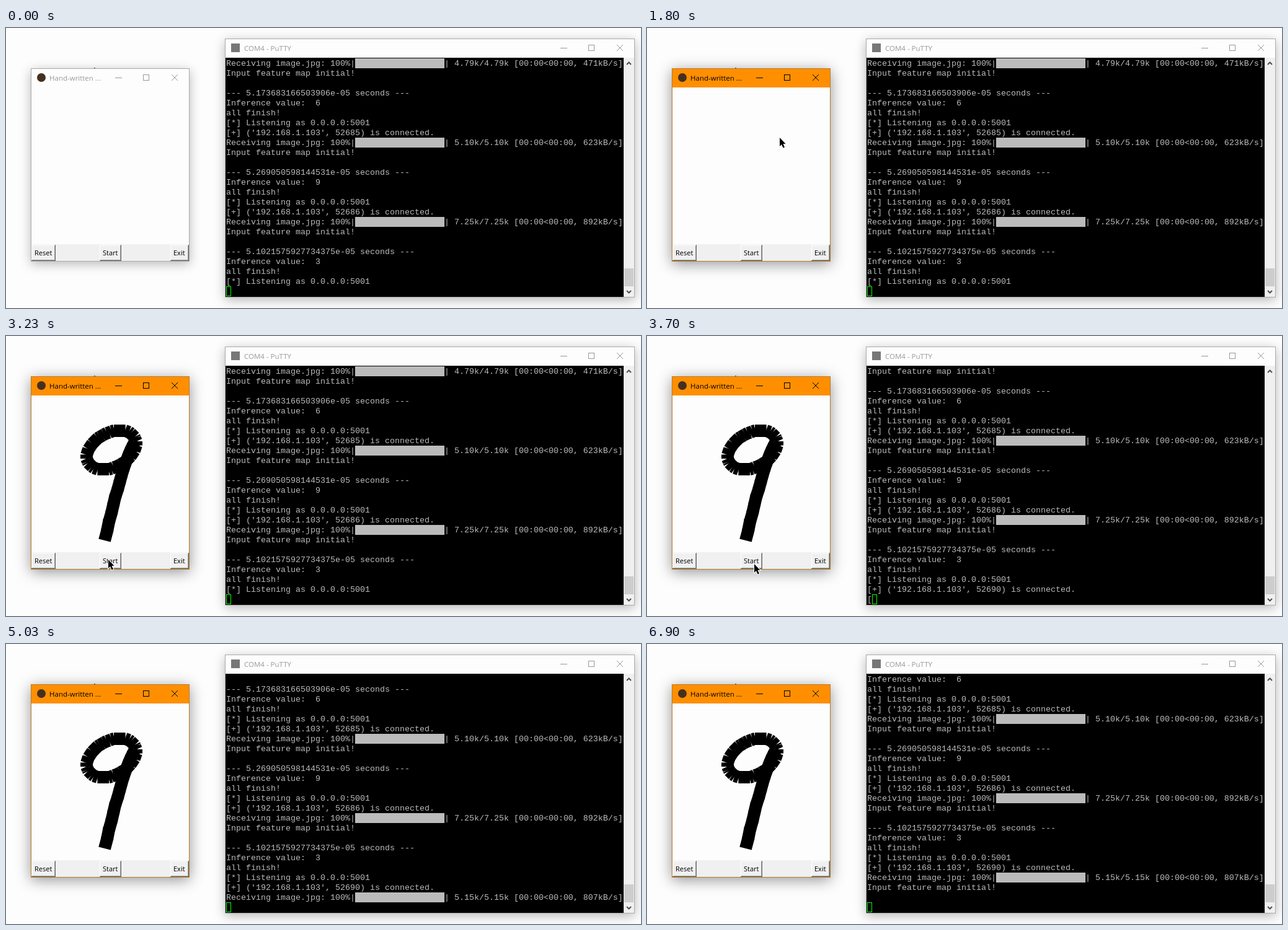
These frames come from a looping animation (1024x452 px, 8 s). An HTML page with a canvas:

```html
<!DOCTYPE html>
<html lang="en">
<head>
<meta charset="utf-8">
<title>Hand-written digit demo</title>
<style>
  html, body { margin: 0; width: 100%; height: 100%; overflow: hidden; background: #fdfdfd; }
  canvas { display: block; }
</style>
</head>
<body>
<canvas id="stage" width="1024" height="452"></canvas>
<script>
const ctx = document.getElementById('stage').getContext('2d');
const LOOP = 8000, ROWS = 24, COLS = 80, CELL_W = 8, CELL_H = 16, TERM_X = 355, TERM_Y = 49;
const UI_FONT = '"Open Sans", "Noto Sans", sans-serif';
const PAPER = '#fdfdfd', FACE = '#f0f0f0', FADED = '#999', INK = '#000';

// ---- terminal log ----
const bar = '█'.repeat(18);
const receive = (size, rate) =>
  `Receiving image.jpg: 100%|${bar}| ${size}k/${size}k [00:00<00:00, ${rate}kB/s]`;
const connect = port => `[+] ('192.168.1.103', ${port}) is connected.`;
const READY = 'Input feature map initial!';
const infer = (seconds, digit) => [READY, '', `--- ${seconds}e-05 seconds ---`,
  `Inference value:  ${digit}`, 'all finish!', '[*] Listening as 0.0.0.0:5001'];
const pending = `Receiving image.jpg:   0%|${' '.repeat(26)}| 0.00/5.15k [00:00<?, ?B/s]`;

const history = [
  receive('4.79', 471), ...infer('5.173683166503906', 6), connect(52685),
  receive('5.10', 623), ...infer('5.269050598144531', 9), connect(52686),
  receive('7.25', 892), ...infer('5.1021575927734375', 3)
];

// Lines printed after the history; the text cursor ends the last one.
function printed(t) {
  if (t < 3670) return [''];
  const log = [connect(52690)];
  if (t < 5000) return [...log, t < 3700 ? '' : t < 3730 ? '[' : pending];
  log.push(receive('5.15', 807));
  if (t < 6830) return [...log, ''];
  log.push(READY);
  return t < 6870 ? log : t < 6900 ? [...log, ''] : [...log, '', ''];
}

// ---- pen stroke: a tilted ellipse, then a bent leg, in whole-pixel steps ----
const LOOP_STEPS = 64, LEG_STEPS = 15;
const loopPoint = u => {
  const a = u * 2 * Math.PI;
  return [170 + 40 * Math.cos(a), 184 - 31.5 * Math.sin(a + .35)];
};
const legPoint = u => {
  const v = 1 - u, bend = (a, b, c) => v * v * a + 2 * u * v * b + u * u * c;
  return [bend(207, 186, 159), bend(172, 212, 330)];
};
const steps = (curve, n) =>
  Array.from({ length: n + 1 }, (_, i) => curve(i / n).map(Math.round));
const stroke = [...steps(loopPoint, LOOP_STEPS), ...steps(legPoint, LEG_STEPS)];
const penEnd = stroke[stroke.length - 1];

const progress = (t, start, end) => Math.max(0, Math.min(1, (t - start) / (end - start)));
const penIndex = t => Math.floor(progress(t, 1930, 2600) * LOOP_STEPS +
  progress(t, 2600, 2900) ** 4 * (LEG_STEPS + 1));

function pointer(t) {
  const glide = (start, end, from, to) =>
    from.map((v, i) => v + (to[i] - v) * progress(t, start, end));
  const canvasSpot = [214, 177], startButton = [165, 361], pressed = [173, 368];
  if (t < 1100 || t >= 5030) return null;
  if (t < 1930) return glide(1100, 1800, [0, 415], canvasSpot);
  if (t < 2900) return stroke[penIndex(t)];
  if (t < 3230) return glide(3100, 3230, penEnd, startButton);
  if (t < 3700) return glide(3600, 3700, startButton, pressed);
  return t < 5000 ? glide(3700, 3830, pressed, [147, 429]) : [20, 429];
}

// ---- drawing helpers ----
function rect(x, y, w, h, color) {
  ctx.fillStyle = color;
  ctx.fillRect(x, y, w, h);
}
function text(str, x, y, color, font) {
  ctx.font = font;
  ctx.fillStyle = color;
  ctx.fillText(str, x, y);
}
function line(color, ...points) {
  ctx.strokeStyle = color;
  ctx.beginPath();
  points.forEach(([x, y]) => ctx.lineTo(x, y));
  ctx.stroke();
}
function frame(x, y, w, h, border, shade, blur) {
  ctx.save();
  ctx.shadowColor = `rgba(0,0,0,${shade})`;
  ctx.shadowBlur = blur;
  ctx.shadowOffsetY = 4;
  rect(x, y, w, h, border);
  ctx.restore();
  rect(x + 1, y + 1, w - 2, h - 2, PAPER);
}
// Minimise, maximise and close; x is the left end of the first mark.
function captionMarks(x, y, color) {
  ctx.lineWidth = 1;
  rect(x, y, 11, 1, color);
  ctx.strokeStyle = color;
  ctx.strokeRect(x + 45.5, y - 4.5, 9, 9);
  line(color, [x + 91, y - 5], [x + 101, y + 5]);
  line(color, [x + 101, y - 5], [x + 91, y + 5]);
}
function button(label, x, w) {
  rect(x, 350, w, 26, '#696969');
  rect(x, 350, w - 1, 25, '#fff');
  rect(x + 1, 351, w - 2, 24, '#a0a0a0');
  rect(x + 1, 351, w - 3, 23, FACE);
  text(label, x + 5, 367, INK, '11px ' + UI_FONT);
}
function chevron(y, direction) {
  ctx.lineWidth = 2;
  line('#505050', [1001, y], [1004.5, y - 3.5 * direction], [1008, y]);
}

function drawPad(t) {
  const active = t >= 1500, color = active ? INK : FADED;
  frame(40, 65, 256, 312, active ? '#b87a28' : '#aaa', active ? .42 : .28, active ? 22 : 17);
  rect(142, 64, 2, 1, '#444');
  if (active) rect(41, 66, 254, 30, '#ff8f00');
  ctx.fillStyle = '#453020';
  ctx.beginPath();
  ctx.arc(57, 80, 7, 0, 7);
  ctx.fill();
  text('Hand-written ...', 70, 85, color, '11.5px ' + UI_FONT);
  captionMarks(176, 80, color);
  rect(41, 349, 254, 27, FACE);
  button('Reset', 41, 39);
  button('Start', 151, 35);
  button('Exit', 265, 30);

  if (t < 1930) return;
  ctx.lineWidth = 20;
  for (let i = 1; i <= penIndex(t); i++) {
    const [x, y] = stroke[i], [px, py] = stroke[i - 1];
    // A slight overlap closes the seams between straight pieces.
    line(INK, [px - (x - px) * .2, py - (y - py) * .2], [x, y]);
  }
}

function drawTerminal(t) {
  frame(353, 17, 661, 418, '#aaa', .28, 17);
  rect(363, 25, 14, 14, '#777');
  text('COM4 - PuTTY', 384, 37, FADED, '11.5px ' + UI_FONT);
  captionMarks(894, 32, FADED);
  rect(354, 48, 642, 386, INK);
  rect(996, 48, 17, 386, FACE);
  rect(997, 388, 15, 29, '#cdcdcd');
  chevron(59, 1);
  chevron(424, -1);

  const rows = [...history, ...printed(t)].slice(-ROWS);
  rows.forEach((row, i) => {
    const y = TERM_Y + i * CELL_H, barAt = row.indexOf(bar);
    text(row.replace(bar, ' '.repeat(bar.length)), TERM_X, y + 12, '#bbb',
      '13.333px "Liberation Mono", monospace');
    if (barAt >= 0) rect(TERM_X + barAt * CELL_W, y, bar.length * CELL_W, CELL_H, '#bbb');
  });
  const column = Math.min(rows[ROWS - 1].length, COLS - 1);
  ctx.lineWidth = 1;
  ctx.strokeStyle = '#0f0';
  ctx.strokeRect(TERM_X + column * CELL_W + .5, TERM_Y + (ROWS - 1) * CELL_H + .5, 7, 15);
}

const arrow = new Path2D('M0 0V14L3 11L5.5 16.5L8 15.5L5.5 10H9.5Z');
function drawPointer(t) {
  const position = pointer(t);
  if (!position) return;
  ctx.save();
  ctx.translate(...position.map(Math.round));
  ctx.strokeStyle = '#fff';
  ctx.lineWidth = 2;
  ctx.stroke(arrow);
  ctx.fillStyle = INK;
  ctx.fill(arrow);
  ctx.restore();
}

function render() {
  const t = performance.now() % LOOP;
  rect(0, 0, 1024, 452, PAPER);
  drawPad(t);
  drawTerminal(t);
  drawPointer(t);
  requestAnimationFrame(render);
}
render();
</script>
</body>
</html>
```
